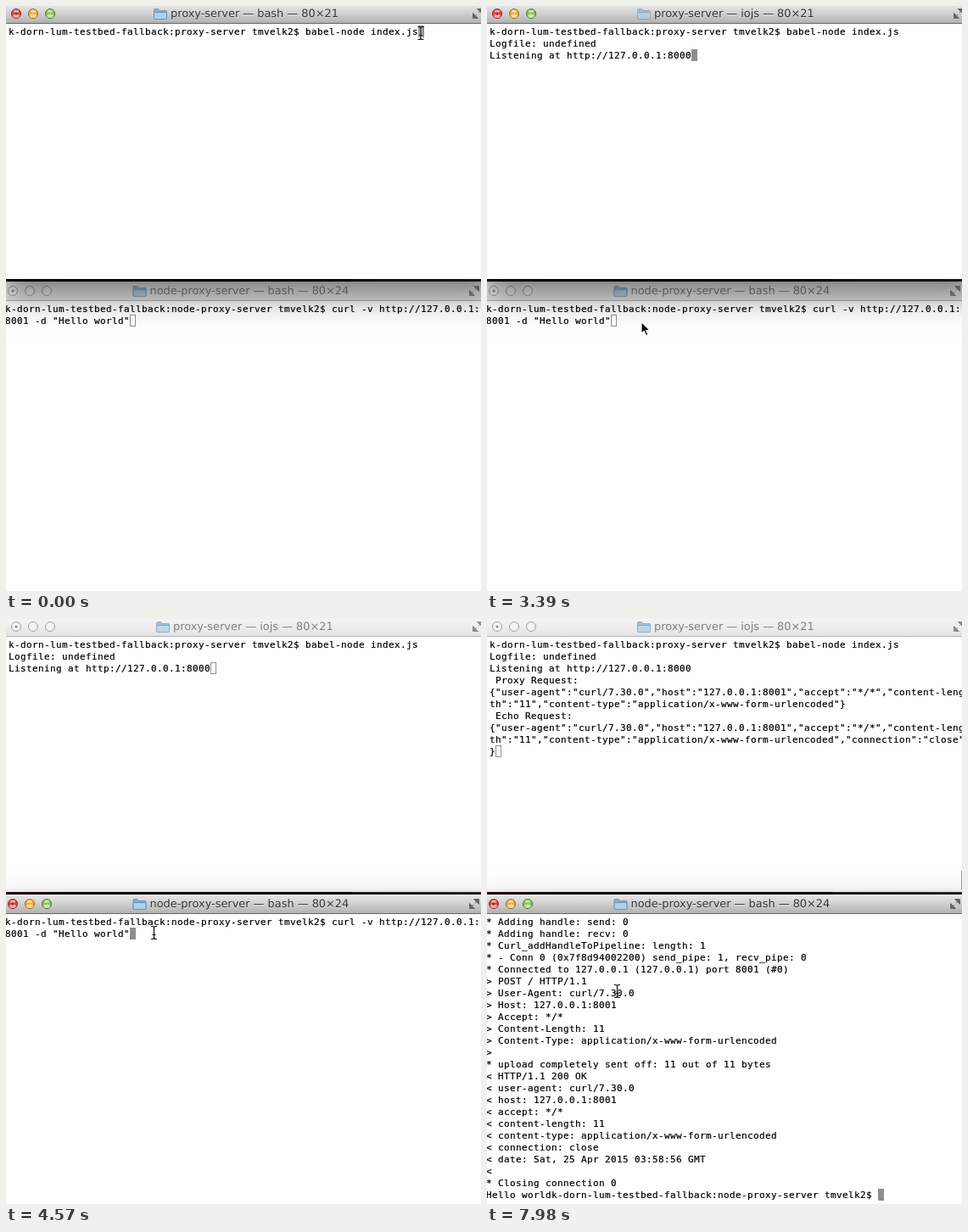
An HTML page that plays this animation: 560 px wide and 690 px high, repeating every 8 s.

```html
<!DOCTYPE html>
<html lang="en">
<head>
<meta charset="utf-8">
<title>Two terminals</title>
<style>
  html, body { margin: 0; width: 100%; height: 100%; overflow: hidden; }
  body { position: relative; background: #fefefe; }
  #stage { position: absolute; left: 0; top: 0; width: 560px; height: 690px; overflow: hidden;
    background: linear-gradient(90deg, #1c0410, #000 90px 407px, #1f1e1b 408px, #2a2824); }
  .win { position: absolute; width: 585px; background: #fefefe; z-index: 1; }
  .win.active { z-index: 2; box-shadow: 0 18px 36px rgba(0,0,0,.54), 0 0 5px 2px rgba(0,0,0,.2); }
  #top { left: -3px; top: -2px; height: 324px; }
  #low { left: -7px; top: 325px; height: 400px; }
  .bar { position: absolute; left: 0; top: 0; width: 100%; height: 22px;
    background: linear-gradient(#f6f6f6, #e4e4e4); border-bottom: 1px solid #b4b4b4; }
  .active .bar { background: linear-gradient(#e9e9e9, #cfcfcf 50%, #b2b2b2); border-color: #686868; }
  .title { position: absolute; top: 1px; font: 12.9px/21px "DejaVu Sans", sans-serif; white-space: pre;
    color: #808080; text-rendering: geometricPrecision; }
  .active .title { color: #333; text-shadow: 0 1px rgba(255,255,255,.45); }
  .bar svg { position: absolute; left: 0; top: 0; overflow: visible; }
  .lamp { fill: rgba(255,255,255,.25); stroke: #a0a0a0; }
  .active .lamp { fill: var(--c); stroke: var(--s); }
  .shine { fill: #fff; opacity: .25; }
  .active .shine { opacity: .55; }
  .dot { fill: #8a8a8a; }
  .active .dot { fill: #9b2a24; }
  .folder { opacity: .75; }
  .active .folder { opacity: 1; }
  .active .folder.pale { opacity: .65; }
  .zoom { stroke: #8c8c8c; fill: #8c8c8c; }
  .active .zoom { stroke: #666; fill: #666; }
  pre { position: absolute; left: 6px; top: 26px; margin: 0; color: #000; -webkit-text-stroke: .2px #000;
    font: 11px/14px "DejaVu Sans Mono", monospace; letter-spacing: var(--gap, 0); }
  .caret { position: absolute; width: 7px; height: 14px; box-sizing: border-box; border: 1px solid #8d9488; }
  .active .caret { background: #8e8e8e; border-color: #8e8e8e; }
  #thumb { position: absolute; left: 559px; top: 297px; width: 2px; height: 22px; background: #999; z-index: 3; }
  .mouse { position: absolute; left: 0; top: 0; z-index: 9; overflow: visible; }
</style>
</head>
<body>
<div id="stage">
  <div id="top" class="win"></div>
  <div id="low" class="win"></div>
  <div id="thumb"></div>
  <svg id="beam" class="mouse" width="1" height="1" fill="none" stroke="#111">
    <path stroke="#fff" stroke-width="3" opacity=".6" d="M0-6V6"/>
    <path d="M-3.5-7.5H-2Q0-7.5 0-5.5Q0-7.5 2-7.5H3.5M0-6V6M-3.5 7.5H-2Q0 7.5 0 5.5Q0 7.5 2 7.5H3.5M-2 2.5H2" stroke-width="1.2"/>
  </svg>
  <svg id="arrow" class="mouse" width="1" height="1">
    <path d="M0 0V14L3.2 11L5.6 16.5L8 15.4L5.6 10.2H10Z" fill="#000" stroke="#fff" stroke-width="1.2"/>
  </svg>
</div>
<script>
const LOOP = 8000, CELL = 7, ROW = 14;
const $ = id => document.getElementById(id);

const prompt = dir => `k-dorn-lum-testbed-fallback:${dir} tmvelk2$ `;
const start = prompt("proxy-server") + "babel-node index.js";
const listening = start + "\nLogfile: undefined\nListening at http://127.0.0.1:8000";
const headers = `{"user-agent":"curl/7.30.0","host":"127.0.0.1:8001","accept":"*/*","content-leng
th":"11","content-type":"application/x-www-form-urlencoded"`;
const served = `${listening}
 Proxy Request:
${headers}}
 Echo Request:
${headers},"connection":"close"
}`;
const request = prompt("node-proxy-server") + `curl -v http://127.0.0.1:
8001 -d "Hello world"`;
const response = `* Adding handle: send: 0
* Adding handle: recv: 0
* Curl_addHandleToPipeline: length: 1
* - Conn 0 (0x7f8d94002200) send_pipe: 1, recv_pipe: 0
* Connected to 127.0.0.1 (127.0.0.1) port 8001 (#0)
> POST / HTTP/1.1
> User-Agent: curl/7.30.0
> Host: 127.0.0.1:8001
> Accept: */*
> Content-Length: 11
> Content-Type: application/x-www-form-urlencoded
>
* upload completely sent off: 11 out of 11 bytes
< HTTP/1.1 200 OK
< user-agent: curl/7.30.0
< host: 127.0.0.1:8001
< accept: */*
< content-length: 11
< content-type: application/x-www-form-urlencoded
< connection: close
< date: Sat, 25 Apr 2015 03:58:56 GMT
<
* Closing connection 0
Hello world${prompt("node-proxy-server")}`;

const lamp = (x, fill, edge) => `
  <circle class="lamp" cx="${x}" cy="11" r="5.5" style="--c:${fill};--s:${edge}"/>
  <ellipse class="shine" cx="${x}" cy="8.2" rx="3" ry="1.6"/>
  <ellipse class="shine" cx="${x}" cy="13.8" rx="3.8" ry="2.2"/>`;

function makeWindow(id) {
  const win = $(id);
  win.innerHTML = `<div class="bar"><svg width="585" height="22">
    ${lamp(15, "#e0483f", "#8c2b25")}<circle class="dot" cx="15" cy="11" r="1.5"/>
    ${lamp(35, "#f0ac37", "#9a6a1c")}${lamp(55, "#8cc152", "#4c7a2b")}
    <g class="folder" stroke="#6b94b5">
      <path fill="#86b0d2" d="M.5 12V1.5Q.5.5 1.5.5H5.5L7 2.5H14.5Q15.5 2.5 15.5 3.5V12Z"/>
      <path fill="#aed0e8" d="M.5 4.5H15.5V11.5Q15.5 12.5 14.5 12.5H1.5Q.5 12.5.5 11.5Z"/>
    </g>
    <path class="zoom" d="M560 10L563 7M558 12L555 15M558.5 5.5H564.5V11.5ZM553.5 10.5V16.5H559.5Z"/>
  </svg><span class="title"></span></div><pre></pre><i class="caret"></i>`;
  const part = name => win.querySelector(name);
  const title = part(".title"), folder = part(".folder"), text = part("pre"), caret = part(".caret");
  return {
    activate: on => win.classList.toggle("active", on),
    name(x, label, pale) {
      title.textContent = label;
      title.style.left = x + 20 + "px";
      folder.setAttribute("transform", `translate(${x} 5)`);
      folder.classList.toggle("pale", pale);
    },
    print(str) {
      text.textContent = str;
      const lines = str.split("\n");
      caret.style.left = 6 + CELL * lines.at(-1).length + "px";
      caret.style.top = 25 + ROW * (lines.length - 1) + "px";
    }
  };
}

const upper = makeWindow("top"), lower = makeWindow("low");

// Snap the monospace advance to the terminal's cell grid.
const probe = document.createElement("span");
probe.textContent = "0".repeat(80);
document.querySelector("pre").replaceChildren(probe);
document.body.style.setProperty("--gap", CELL - probe.getBoundingClientRect().width / 80 + "px");

lower.name(156.5, "node-proxy-server — bash — 80×24", false);

const screens = [
  [0, start], [600, start + "\n"], [1920, listening], [5610, served]
];
const pointer = [
  [0, "beam", 489, 32], [2660, "beam", 510.5, 249],
  [2800, "arrow", 523.5, 336.5], [2950, "arrow", 349, 374.5], [3100, "arrow", 291, 358.5],
  [3390, "arrow", 182, 372.5], [3530, "arrow", 175, 372.5], [3680, "arrow", 174, 371.5],
  [3830, "arrow", 174, 370.5], [3970, "arrow", 174, 369.5], [4270, "beam", 174.5, 370],
  [6480, "arrow", 167, 332.5], [6630, "arrow", 148, 255], [6780, "arrow", 164, 197.5],
  [7830, "arrow", 154, 308.5], [7980, "beam", 153.5, 439]
];
const at = (steps, t) => steps.findLast(s => s[0] <= t);

const seen = {};
function update(key, value, apply) {
  if (seen[key] === value) return;
  seen[key] = value;
  apply(value);
}

function draw(t) {
  update("screen", at(screens, t)[1], s => upper.print(s));
  update("running", t >= 740, on =>
    on ? upper.name(180, "proxy-server — iojs — 80×21", true)
       : upper.name(177, "proxy-server — bash — 80×21", false));
  update("reply", t >= 5610, on => lower.print(on ? response : request));
  update("lowActive", t >= 4270, on => { lower.activate(on); upper.activate(!on); });
  update("thumb", t >= 7230, on => $("thumb").hidden = !on);
  update("pointer", at(pointer, t), ([, kind, x, y]) => {
    for (const id of ["beam", "arrow"]) $(id).style.display = id === kind ? "" : "none";
    $(kind).style.transform = `translate(${x}px, ${y}px)`;
  });
}

const begin = performance.now();
function tick(now) {
  draw(Math.max(0, now - begin) % LOOP);
  requestAnimationFrame(tick);
}
draw(0);
requestAnimationFrame(tick);
</script>
</body>
</html>
```
